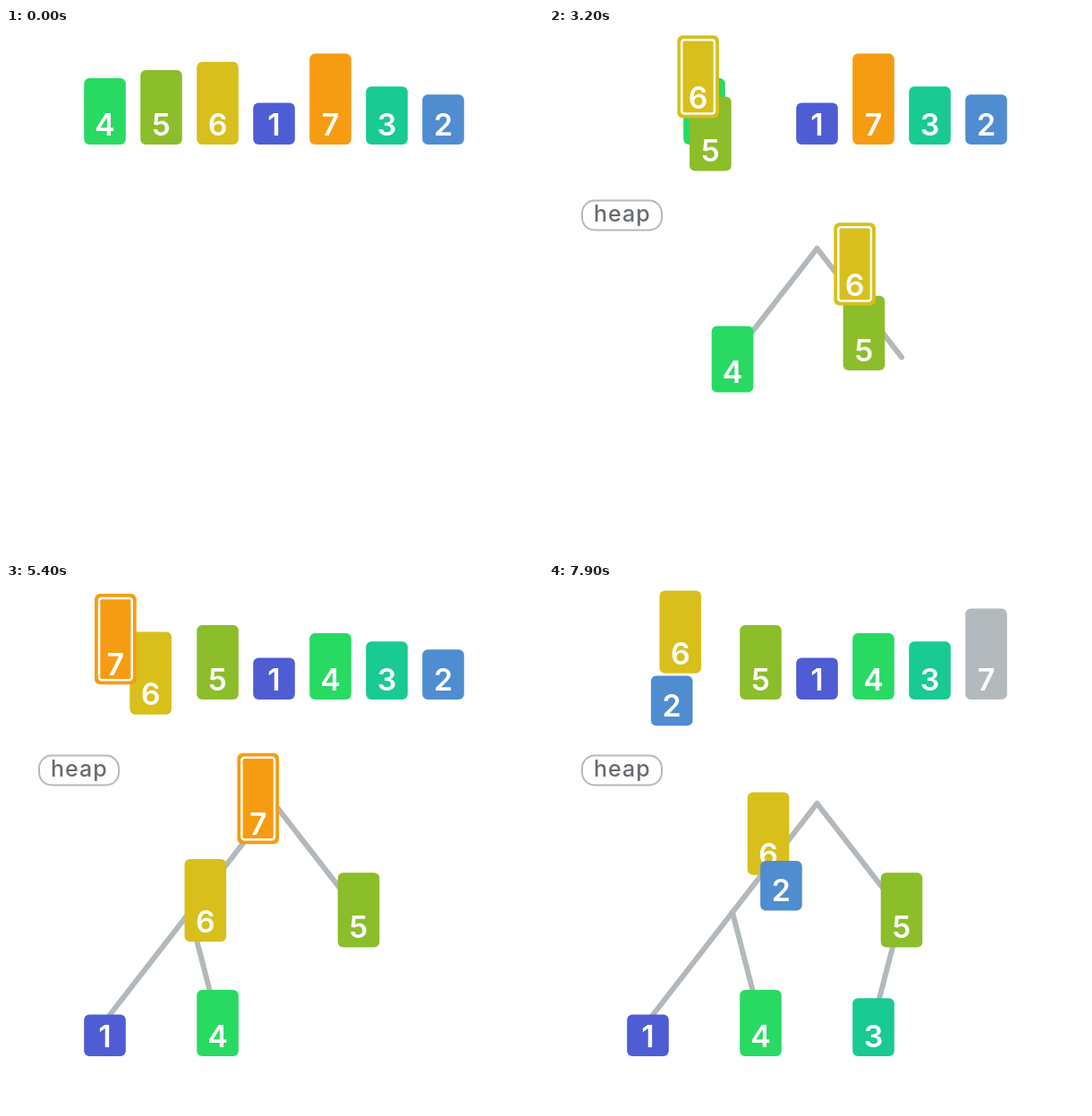
Recreate the animation shown at these times as an HTML page. Size 600 by 588 pixels, loop 8000 ms.

```html
<!DOCTYPE html>
<html lang="en">
<head>
<meta charset="utf-8">
<title>Heap sort</title>
<style>
  html, body { margin: 0; width: 100%; height: 100%; overflow: hidden; background: #fff; }
  svg { display: block; }
  text { font-family: Inter, "Open Sans", sans-serif; }
  .digit { font-size: 34px; font-weight: 600; fill: #fff; text-anchor: middle; }
  .label { font-size: 25px; font-weight: 500; fill: #666b70; letter-spacing: 1px; }
  .edge { stroke: #b2b8bb; stroke-width: 6; stroke-linecap: round; }
  .ring { fill: none; stroke: #fff; stroke-width: 2.5; }
</style>
</head>
<body>
<svg id="stage" width="600" height="588" viewBox="0 0 600 588">
  <g id="label">
    <rect x="37" y="192.5" width="89" height="33" rx="14" fill="#fff" stroke="#b4b9bc" stroke-width="2"/>
    <text class="label" x="50" y="216">heap</text>
  </g>
  <g id="edges"></g>
  <g id="row"></g>
  <g id="tree"></g>
</svg>
<script>
const LOOP = 8000, MOVE = 467, PAUSE = 106, FIRST = 968, ARC = 30;
const VALUES = [4, 5, 6, 1, 7, 3, 2];
const COLORS = {
  1: [78, 93, 211], 2: [79, 141, 208], 3: [25, 202, 146], 4: [40, 218, 98],
  5: [140, 189, 42], 6: [216, 191, 27], 7: [246, 156, 18]
};
const GRAY = [178, 186, 189];
const WIDTH = 46.6;

// Each slot is the bottom centre of a card.
const rowSlot = i => [110.5 + 63 * i, 130];
const treeSlot = i =>
  i === 0 ? [299.5, 285] :
  i < 3 ? [205 + 189 * (i - 1), 406.4] :
  [110.5 + 126 * (i - 3), 528];
const parent = i => (i - 1) >> 1;
const clamp = x => Math.min(1, Math.max(0, x));
const mix = (a, b, p) => a.map((x, i) => x + (b[i] - x) * p);

// Run the sort once and record its moves.
function plan() {
  const a = VALUES.slice(), steps = [];
  let clock = FIRST;
  const add = (kind, data, rest = 0) => {
    steps.push({ kind, start: clock, ...data });
    clock += MOVE + rest;
  };
  const swap = (up, down, lit) => {
    add('swap', { up, down, lit }, PAUSE);
    [a[up], a[down]] = [a[down], a[up]];
  };
  for (let i = 0; i < a.length; i++) {
    const lit = a[i];
    add('copy', { slot: i, lit });
    for (let k = i; k > 0 && a[k] > a[parent(k)]; k = parent(k)) swap(k, parent(k), lit);
  }
  clock += 134;
  const last = a.length - 1;
  swap(last, 0);
  add('pop', { slot: last });
  swap(a[1] > a[2] ? 1 : 2, 0);
  return steps;
}

const STEPS = plan();
const BUILT = STEPS.filter(s => s.lit).pop().start + MOVE;

const get = id => document.getElementById(id);
function make(host, tag, attrs) {
  const el = document.createElementNS('http://www.w3.org/2000/svg', tag);
  for (const k in attrs) el.setAttribute(k, attrs[k]);
  return host.appendChild(el);
}

function makeCard(host, value) {
  const g = make(host, 'g', {});
  const h = 46.6 + 9.13 * (value - 1);
  const body = make(g, 'rect', { x: -WIDTH / 2, y: -h, width: WIDTH, height: h, rx: 6 });
  const ring = make(g, 'rect', {
    class: 'ring', x: -WIDTH / 2 + 5, y: -h + 5, width: WIDTH - 10, height: h - 10, rx: 3
  });
  make(g, 'text', { class: 'digit', x: 0, y: -10.3 }).textContent = value;
  return { g, body, ring, value };
}

function place(card, [x, y], color, lit, alpha) {
  card.g.setAttribute('transform', `translate(${x.toFixed(2)} ${y.toFixed(2)})`);
  card.g.setAttribute('opacity', alpha);
  card.body.setAttribute('fill', `rgb(${color.map(Math.round)})`);
  card.ring.setAttribute('visibility', lit ? 'visible' : 'hidden');
}

const edges = VALUES.map((_, i) => {
  if (!i) return null;
  const [x1, y1] = treeSlot(parent(i)), [x2, y2] = treeSlot(i);
  return make(get('edges'), 'line', { class: 'edge', x1, y1: y1 - 39, x2, y2: y2 - 39 });
});
const rowCards = VALUES.map(v => makeCard(get('row'), v));
const treeCards = VALUES.map(v => makeCard(get('tree'), v));

function draw(t) {
  const order = VALUES.slice();
  const edgeAlpha = VALUES.map(() => 0), alpha = {}, gray = {}, moved = {}, copied = {};
  let lit = 0;

  for (const s of STEPS) {
    if (t < s.start) break;
    const p = clamp((t - s.start) / MOVE);
    lit = s.lit;
    if (s.kind === 'copy') {
      const v = order[s.slot];
      alpha[v] = 1;
      if (p < 1) copied[v] = p;
      else edgeAlpha[s.slot] = 1;
    } else if (s.kind === 'swap') {
      const { up, down } = s;
      if (p < 1) {
        const lift = ARC * Math.sin(Math.PI * p);
        moved[order[up]] = { to: down, p, dy: -lift };
        moved[order[down]] = { to: up, p, dy: lift };
      } else {
        [order[up], order[down]] = [order[down], order[up]];
      }
    } else {
      const v = order[s.slot];
      gray[v] = p;
      alpha[v] = edgeAlpha[s.slot] = 1 - p;
    }
  }
  if (t >= BUILT) lit = 0;

  const locate = (v, slot) => {
    const i = order.indexOf(v), m = moved[v];
    if (!m) return slot(i);
    const [x, y] = mix(slot(i), slot(m.to), m.p);
    return [x, y + m.dy];
  };

  VALUES.forEach((v, i) => {
    const spot = locate(v, rowSlot);
    let node = locate(v, treeSlot);
    if (v in copied) node = mix(spot, node, copied[v]);
    place(rowCards[i], spot, mix(COLORS[v], GRAY, gray[v] || 0), v === lit, 1);
    place(treeCards[i], node, COLORS[v], v === lit, alpha[v] || 0);
    if (i) edges[i].setAttribute('opacity', edgeAlpha[i]);
  });
  get('label').setAttribute('opacity', clamp((t - 740) / 220));
}

const begin = performance.now();
function tick() {
  draw((performance.now() - begin) % LOOP);
  requestAnimationFrame(tick);
}
draw(0);
requestAnimationFrame(tick);
</script>
</body>
</html>
```
